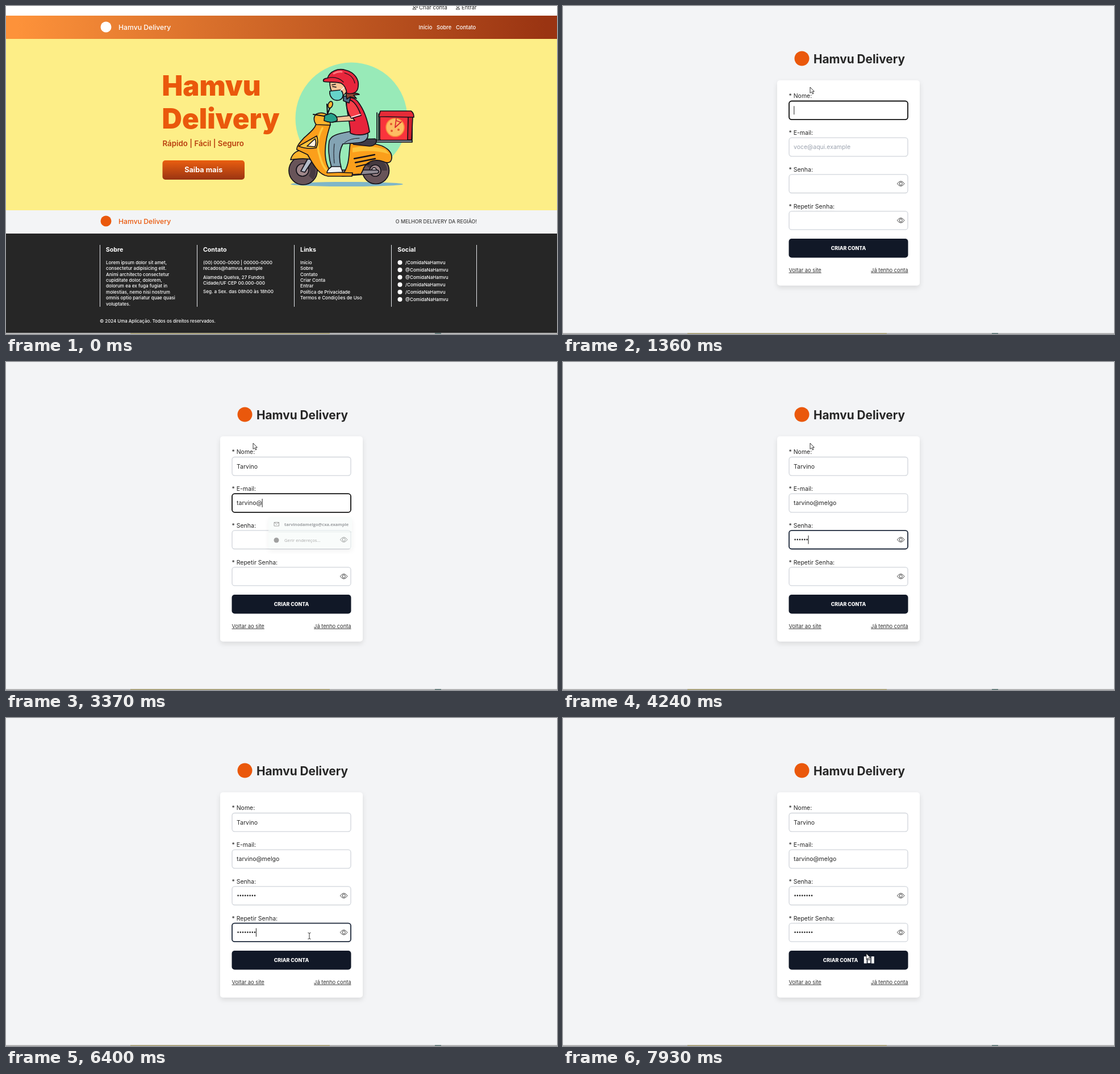
Recreate the animation shown at these times as an HTML page. Size 970 by 578 pixels, loop 8000 ms.

```html
<!DOCTYPE html>
<html lang="pt">
<head>
<meta charset="utf-8">
<title>Cadastro</title>
<style>
html, body { margin: 0; width: 100%; height: 100%; overflow: hidden; background: #f3f4f6; }
svg { display: block; width: 100vw; height: 100vh; font-family: Inter, "Open Sans", sans-serif; }
text { white-space: pre; }
.popup, .status { font-family: "Open Sans", "Noto Sans", sans-serif; }
.link { text-decoration: underline; }
.art { stroke: #14121a; stroke-width: 1.7; stroke-linejoin: round; stroke-linecap: round; }
.art .flat { stroke: none; }
.art .line { fill: none; }
</style>
</head>
<body>
<svg viewBox="0 0 970 578" preserveAspectRatio="none">
  <defs>
    <linearGradient id="bar"><stop offset=".02" stop-color="#fd923a"/><stop offset=".98" stop-color="#9a3412"/></linearGradient>
    <linearGradient id="cta" x2="0" y2="1"><stop stop-color="#ea5e10"/><stop offset="1" stop-color="#9a3412"/></linearGradient>
    <filter id="shade" x="-10%" y="-10%" width="120%" height="125%"><feDropShadow dx="0" dy="4" stdDeviation="4" flood-opacity=".11"/></filter>
  </defs>

  <g id="home">
    <rect width="970" height="17" fill="#fff"/>
    <g fill="none" stroke="#333" stroke-width=".9">
      <circle cx="719" cy="1" r="1.8"/><path d="M716 6q0-2.6 3-2.6t3 2.6zM722 2h3M723.5.5v3"/>
      <circle cx="795.5" cy="1" r="1.8"/><path d="M792.3 6q0-2.6 3.2-2.6t3.2 2.6z"/>
    </g>
    <rect id="underline" x="727" y="6.6" width="51" height=".9" fill="#262626"/>
    <rect y="17" width="970" height="41" fill="url(#bar)"/>
    <circle cx="176" cy="37" r="9.5" fill="#fff"/>
    <rect y="58" width="970" height="302" fill="#fdee87"/>
    <rect x="275.5" y="272" width="144.5" height="34" rx="5" fill="url(#cta)"/>

    <circle cx="608" cy="198" r="98.5" fill="#98eab8"/>
    <ellipse cx="600" cy="314" rx="99" ry="4" fill="#7fb6c8"/>
    <g class="art">
      <path class="line" d="M653 188V239M656 190V237"/>
      <rect x="658" y="190" width="57" height="47" rx="3" fill="#fa343c"/>
      <path d="M708 195h8l-2 41h-7z" fill="#d0222f"/>
      <path d="M656 195l3-10h54q5 3 5 11z" fill="#e52b38"/>
      <rect x="651" y="236.5" width="64" height="3.5" fill="#8c9ca4"/>
      <circle cx="685" cy="214" r="16" fill="#fdbd63" stroke="#fb8a3c"/>
      <path class="line" d="M685 214l2-16M685 214l11-10M687 202l8 3" stroke="#d8262f"/>
      <g class="flat" fill="#e4572e"><circle cx="678" cy="208" r="2"/><circle cx="679" cy="220" r="2"/><circle cx="691" cy="218" r="2"/></g>

      <circle cx="651" cy="290" r="23.5" fill="#685459"/>
      <path class="flat" d="M633 281a20 20 0 0 1 38 9l-9 0a12 12 0 0 0-22-5z" fill="#463a40"/>
      <circle cx="650" cy="290" r="10" fill="#a0888b"/><circle cx="648" cy="289" r="4" fill="#d9cdd0"/>
      <circle cx="523" cy="290" r="25" fill="#685459"/>
      <path class="flat" d="M530 272a21 21 0 0 1 10 34l-7-7a12 12 0 0 0-4-18z" fill="#463a40"/>
      <circle cx="522" cy="289" r="11" fill="#a0888b"/>
      <path d="M519 291l14-25 8 4-15 23z" fill="#b3bac7"/>
      <path d="M588 289h66q5 3 0 6l-62 5z" fill="#8d8790"/>
      <path d="M606 242L648 243C668 246 680 256 679 268C678 278 670 277 664 274C646 268 632 276 628 290L625 296 592 298C606 280 603 260 606 242Z" fill="#fb9f1b"/>
      <path class="flat" d="M610 250q28-6 58 3l7 8q-30-9-65-3z" fill="#fdc33a"/>
      <path class="line" d="M613 269l36-7M615 276l35-7M617 283l22-5" stroke-width="2.3"/>
      <path d="M609 240C612 233 622 235 650 234C654 238 652 246 640 247L612 244Z" fill="#403c48"/>

      <path d="M501 271C504 258 515 252 530 254C546 258 552 268 553 277C540 267 520 268 501 271Z" fill="#fdb32b"/>
      <path d="M546 208L571 209C566 225 561 242 562 262C563 276 567 288 575 293L610 294 609 300 567 300C551 298 541 280 531 262L512 253C511 247 518 240 525 232C535 223 543 217 546 208Z" fill="#fb9f1b"/>
      <path class="line" d="M557 215q-13 24-5 48 5 21 15 29" stroke="#fdc93f" stroke-width="3.5"/>
      <path d="M515 247L547 229Q551 240 546 250 530 253 515 247Z" fill="#fdc33a"/>
      <path d="M530 247l14-13q3 7 0 14z" fill="#fff1dd"/>

      <path d="M636 222C640 232 634 240 620 241L593 243C586 256 586 270 590 284L573 284C568 268 567 250 569 238C572 228 584 225 606 221Z" fill="#83a3b3"/>
      <path class="line" d="M596 241q10-8 26-8M578 243q-2 16 0 34" stroke-width="1"/>
      <path d="M573 283h16l4 10-28 1q0-5 8-11z" fill="#edf2f6"/>
      <path d="M598 163C604 160 612 161 619 168C630 182 637 202 640 222C632 228 616 229 606 224C607 210 600 190 598 163Z" fill="#e7243b"/>
      <path d="M607 193l-29 3v8l36-2z" fill="#f7c497"/>
      <path d="M600 166C608 163 618 172 625 193L608 198C602 190 598 178 600 166Z" fill="#f73f49"/>
      <path class="line" d="M608 196l16-5" stroke="#fff" stroke-width="1.5"/>

      <path d="M547 190C556 186 568 190 570 198L571 210 546 209C541 202 541 194 547 190Z" fill="#fdb32b"/>
      <path class="line" d="M541 191l25 4M566 191l-1-18M566 190l5-12" stroke-width="2.2"/>
      <ellipse cx="571" cy="174" rx="3.8" ry="6" transform="rotate(18 571 174)" fill="#fdbb2e"/>
      <path d="M561 193l11-4q12 3 11 13-9 6-23 0z" fill="#27a18a"/>

      <path d="M594 159l13-1-3 13-10-4z" fill="#507087"/>
      <path d="M598 151C606 158 616 150 622 156L612 157 617 163 606 160 600 164Z" fill="#8f4330"/>
      <path d="M570 134C570 150 576 160 590 162L601 150 598 133Z" fill="#f7c497"/>
      <path class="line" d="M575 142l6 1M574 139l6-1"/>
      <path d="M570 150L589 148C596 154 594 164 586 166C576 168 569 160 570 150Z" fill="#65d3c9"/>
      <path class="line" d="M589 149l9-8" stroke="#fff" stroke-width="1.2"/>
      <path d="M566 127C570 115 584 109 598 113C614 117 622 130 620 142C619 152 612 156 600 154C599 146 597 140 590 136C580 133 568 135 559 133Q557 128 566 127Z" fill="#e8263c"/>
      <path class="line" d="M566 127q17-4 28 7M596 118q15 4 18 18" stroke-width="1.2"/>
      <path class="line" d="M577 119q7-4 14-3" stroke="#ff7a80" stroke-width="3"/>
    </g>

    <rect y="360" width="970" height="41" fill="#f3f4f6"/>
    <circle cx="176" cy="379" r="9.5" fill="#ea580c"/>
    <rect y="401" width="970" height="175" fill="#262626"/>
    <path d="M165.500 421V530M336.500 421V530M507.500 421V530M678.500 421V530M828.500 421V530" stroke="#e5e7eb"/>
    <g id="homeText"></g>
    <g id="status" class="status">
      <path d="M-1 563H83q4 0 4 4V579H-1Z" fill="#d5eee8" stroke="#a9c9c1"/>
      <text x="2" y="573" font-size="6.9" fill="#3c4745">servidora:0000/inscrever</text>
    </g>
  </g>

  <g id="form">
    <rect width="970" height="578" fill="#f3f4f6"/>
    <circle cx="420.5" cy="92.5" r="13" fill="#ea580c"/>
    <rect x="377" y="131" width="251" height="361.5" rx="5" fill="#fff" filter="url(#shade)"/>
    <g id="fields"></g>
    <rect x="397.5" y="410" width="210" height="33.5" rx="5" fill="#111827"/>
    <g id="formText"></g>
    <g id="loader" fill="#fff"></g>
    <g id="popup" class="popup">
      <rect x="462" y="273" width="147" height="56" rx="3" fill="#f5fbf9" filter="url(#shade)"/>
      <path d="M462 299.5H609" stroke="#d5dfdc"/>
      <path d="M472 282.5h8.5v6.5H472zl4.250 3.500 4.250-3.500" fill="none" stroke="#444"/>
      <circle cx="476" cy="314" r="4.5" fill="#444"/>
      <text x="490" y="288.5" font-size="7.5" font-weight="700" fill="#3a3f45">tarvinodamelgo@cxa.example</text>
      <text x="490" y="317" font-size="7.7" fill="#555">Gerir endereços...</text>
    </g>
  </g>

  <g stroke-width="1.6">
    <path d="M0 577.2H970" stroke="#a6a6a6"/>
    <path d="M219 577.2H570" stroke="#a39a68"/>
    <path d="M755 577.2h11" stroke="#56716f"/>
  </g>
  <g id="cursor"></g>
</svg>

<script>
const el = id => document.getElementById(id);
const label = (x, y, size, weight, fill, text, extra = "") =>
  `<text x="${x}" y="${y}" font-size="${size}" font-weight="${weight}" fill="${fill}" ${extra}>${text}</text>`;
const column = (x, ys, lines) => lines.map((s, i) => label(x, ys(i), 8.1, 500, "#fff", s)).join("");
const show = (id, amount) => el(id).setAttribute("opacity", +amount);

// Latest value in a list of [time, value] steps
const at = (steps, t) => steps.reduce((v, s) => s[0] <= t ? s[1] : v, null);

const ORANGE = "#ea580c", INK = "#262626", BRAND = "Hamvu Delivery";
const HANDLE = "ComidaNaHamvu";
const tight = i => 455 + i * 10.37;

el("homeText").innerHTML =
  label(727, 5.8, 9.5, 400, INK, "Criar conta") +
  label(802, 5.8, 9.4, 400, INK, "Entrar") +
  label(198, 41.6, 12.2, 500, "#fff", BRAND) +
  [[726.5, "Início"], [758, "Sobre"], [792, "Contato"]].map(([x, s]) => label(x, 41, 9.3, 500, "#fff", s)).join("") +
  label(274.5, 157.5, 49, 900, ORANGE, "Hamvu") +
  label(274.5, 215.8, 49, 900, ORANGE, "Delivery") +
  label(275.5, 247, 13.3, 600, "#b93f0e", "Rápido | Fácil | Seguro") +
  label(347.7, 293.2, 12.7, 700, "#fff", "Saiba mais", 'text-anchor="middle"') +
  label(198, 384.4, 12.2, 500, ORANGE, BRAND) +
  label(829, 383.4, 8.8, 500, "#404040", "O MELHOR DELIVERY DA REGIÃO!", 'text-anchor="end"') +
  ["Sobre", "Contato", "Links", "Social"].map((s, i) => label(175.7 + i * 171.2, 432.5, 10.7, 700, "#fff", s)).join("") +
  column(176, tight, ["Lorem ipsum dolor sit amet,", "consectetur adipisicing elit.", "Animi architecto consectetur",
    "cupiditate dolor, dolorem,", "dolorum ea ex fuga fugiat in", "molestias, nemo nisi nostrum",
    "omnis optio pariatur quae quasi", "voluptates."]) +
  column(347, i => tight(i) + (i > 1 ? 5 : 0) + (i > 3 ? 5 : 0), ["(00) 0000-0000 | 00000-0000", "recados@hamvus.example",
    "Alameda Quelva, 27 Fundos", "Cidade/UF CEP 00.000-000", "Seg. a Sex. das 08h00 às 18h00"]) +
  column(518, tight, ["Início", "Sobre", "Contato", "Criar Conta", "Entrar", "Política de Privacidade", "Termos e Condições de Uso"]) +
  column(703, i => 455 + i * 13, ["/", "@", "@", "/", "/", "@"].map(s => s + HANDLE)) +
  [0, 1, 2, 3, 4, 5].map(i => `<circle cx="693.5" cy="${452 + i * 13}" r="4" fill="#fff"/>`).join("") +
  label(165, 558.3, 7.9, 500, "#fff", "© 2024 Uma Aplicação. Todos os direitos reservados.");

el("formText").innerHTML =
  label(441, 100.6, 20.8, 700, INK, BRAND) +
  label(502.5, 430, 8.8, 800, "#fff", "CRIAR CONTA", 'id="submit" text-anchor="middle"') +
  label(397.5, 468.7, 9.3, 400, "#333", "Voltar ao site", 'class="link"') +
  label(607.5, 468.7, 9.3, 400, "#333", "Já tenho conta", 'class="link" text-anchor="end"');

const TEXTS = ["Tarvino", "tarvino@melgo"];
const TYPED = [
  [[0, 0], [1660, 1], [1830, 2], [1900, 3], [1980, 4], [2050, 5], [2130, 7]],
  [[0, 0], [2530, 1], [2610, 2], [2750, 3], [2830, 4], [2910, 5], [2980, 6], [3140, 7], [3290, 8], [3690, 13]],
  [[0, 0], [4090, 2], [4170, 4], [4240, 6], [4550, 7], [4620, 8]],
  [[0, 0], [5230, 2], [5310, 4], [5470, 5], [5620, 6], [5700, 7], [5780, 8]]
];
const FOCUS = [[0, 0], [2360, 1], [3920, 2], [4870, 3], [7010, -1]];
const fieldTop = i => 167.3 + i * 64.7;

el("fields").innerHTML = ["Nome", "E-mail", "Senha", "Repetir Senha"].map((name, i) => {
  const y = fieldTop(i);
  const eye = i < 2 ? "" : `<g fill="none" stroke="#444" transform="translate(594.7 ${y + 16.4})">
    <path d="M-6.300 0Q0-8.800 6.300 0 0 8.800-6.300 0Z"/><circle r="2.6"/></g>`;
  return label(397.5, y - 4.9, 10.5, 400, INK, `* ${name}:`) +
    `<rect id="box${i}" x="398" y="${y + .2}" width="209" height="32.6" rx="4.5" fill="#fff"/>${eye}` +
    label(406, y + 20.2, 10.5, 400, INK, "", `id="value${i}"`) +
    `<g id="dots${i}" fill="${INK}"></g><rect id="caret${i}" y="${y + 9}" width="1" height="15" fill="#222"/>`;
}).join("");

const ARROW = '<path d="M0 0V10.500L2.500 8.300 4.300 12 6 11.200 4.300 7.600H7.300Z" fill="#fff" stroke="#222" stroke-width=".9" stroke-linejoin="round"/>';
const BEAM = '<path d="M-2.500-5.500Q0-5.500 0-4 0-5.500 2.500-5.500M0-4V4M-2.500 5.500Q0 5.500 0 4 0 5.500 2.500 5.500" fill="none" stroke="#333"/>';
const HAND = '<path d="M0 1Q1-1 2 1V5L6.500 6Q7.500 6.500 7.300 8L6.500 12H1L-2.500 7.500Q-1.500 6 0 7.500Z" fill="#fff" stroke="#222" stroke-width=".9"/>';
const CURSOR = [
  [0, [-50, -50, ARROW]], [500, [708, -6, ARROW]], [580, [713, 1, ARROW]], [660, [720, 5, ARROW]],
  [740, [727, 6, ARROW]], [820, [730, 5, ARROW]], [970, [731, 4, ARROW]],
  [1360, [435, 143, ARROW]], [5620, [431, 125, ARROW]], [5700, [428, 111, ARROW]], [5780, [442, 145, ARROW]],
  [5850, [474, 226, ARROW]], [5930, [508, 315, BEAM]], [6010, [528, 362, BEAM]], [6090, [534, 379, BEAM]],
  [6400, [534, 384, BEAM]], [6480, [535, 399, ARROW]], [6550, [537, 424, HAND]], [6630, [538, 446, ARROW]],
  [6710, [538, 455, ARROW]], [6790, [537, 444, ARROW]], [6860, [535, 428, HAND]], [6940, [534, 417, HAND]],
  [7240, [534, 415, ARROW]]
];
const POPUP = [[0, 0], [2610, .6], [2750, 1], [3290, .85], [3370, .5], [3450, .2], [3520, 0]];
const STATUS = [[0, 0], [970, .4], [1050, .8], [1120, 1]];

function drawField(i, t) {
  const focused = at(FOCUS, t) === i, count = at(TYPED[i], t);
  const value = el("value" + i), box = el("box" + i), caret = el("caret" + i);
  let end = 406.3;
  if (i < 2) {
    const empty = i === 1 && !count;
    value.textContent = empty ? "voce@aqui.example" : TEXTS[i].slice(0, count);
    value.setAttribute("fill", empty ? "#9ca3af" : INK);
    if (count) end = 406 + value.getComputedTextLength();
  } else {
    el("dots" + i).innerHTML = Array.from({ length: count }, (_, k) =>
      `<circle cx="${408.6 + k * 4.2}" cy="${fieldTop(i) + 16.2}" r="1.3"/>`).join("");
    end += count * 4.2;
  }
  box.setAttribute("stroke", focused ? (i < 2 ? "#111" : "#1e293b") : "#d1d5db");
  box.setAttribute("stroke-width", focused ? 1.8 : 1.3);
  caret.setAttribute("x", end);
  show("caret" + i, focused);
}

function drawLoader(t) {
  const busy = t >= 7240, tick = Math.floor((Math.min(t, 7930) - 7240) / 75) * 75;
  el("submit").setAttribute("x", busy ? 488.5 : 502.5);
  el("loader").innerHTML = !busy ? "" : [0, 1, 2].map(i => {
    const h = 14.6 + 3.2 * Math.cos(2 * Math.PI * (tick / 600 + .37 - (i - 1) * .12));
    return `<rect x="${529.8 + i * 6.5}" y="${426.3 - h / 2}" width="4.9" height="${h}"/>`;
  }).join("");
}

function render(t) {
  const atHome = t < 1360;
  show("home", atHome);
  show("form", !atHome);
  show("underline", atHome && t >= 740);
  show("status", at(STATUS, t));
  show("popup", at(POPUP, t));
  for (let i = 0; i < 4; i++) drawField(i, t);
  drawLoader(t);
  const [x, y, shape] = at(CURSOR, t);
  el("cursor").setAttribute("transform", `translate(${x} ${y})`);
  el("cursor").innerHTML = shape;
}

const start = performance.now();
function loop() {
  render((performance.now() - start) % 8000);
  requestAnimationFrame(loop);
}
loop();
</script>
</body>
</html>
```
